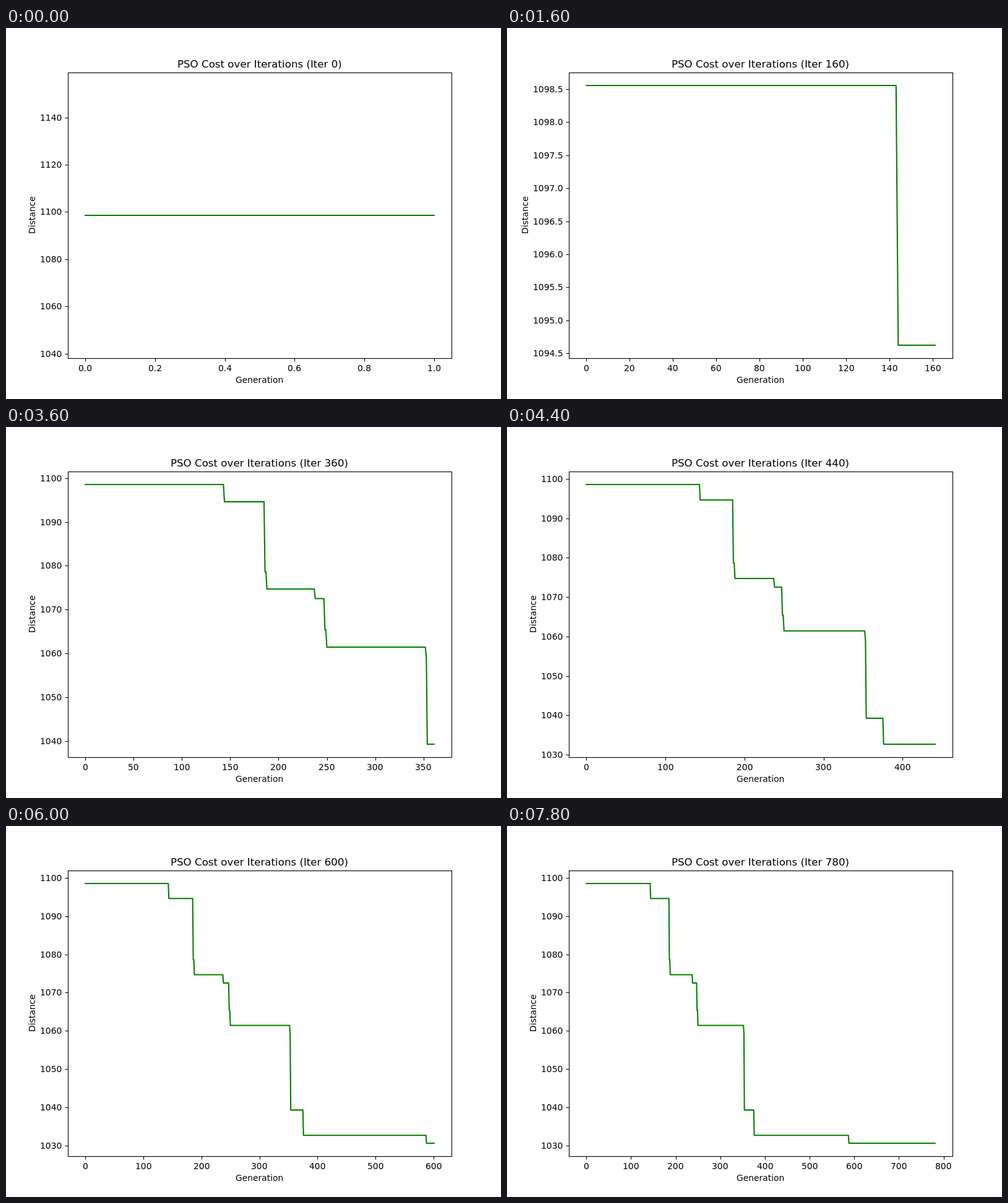
An HTML page with a canvas for the animation above (8 s loop, 800 by 600 pixels).

```html
<!DOCTYPE html>
<html lang="en">
<head>
<meta charset="utf-8">
<title>PSO cost chart</title>
<style>
  html, body { margin: 0; width: 100%; height: 100%; overflow: hidden; background: #fff; }
  canvas { display: block; }
</style>
</head>
<body>
<canvas id="chart" width="800" height="600"></canvas>
<script>
const ctx = document.getElementById('chart').getContext('2d');
const LOOP = 8000, STEP_MS = 200, ITERS_PER_STEP = 20;
const PX_PER_PT = 100 / 72;
const box = { left: 100, right: 720, top: 72, bottom: 534 };

// [generation, best cost from that generation on]
const levels = [
  [0, 1098.555], [144, 1094.625], [186, 1078.63], [188, 1074.7],
  [238, 1072.52], [248, 1065.4], [250, 1061.42], [353, 1059.05],
  [354, 1039.27], [376, 1032.67], [588, 1030.6]
];

// Axis limits with a 5 % margin; a flat range is widened first.
function limits(min, max) {
  if (min === max) [min, max] = [min * 0.95, max * 1.05];
  const margin = (max - min) * 0.05;
  return { lo: min - margin, hi: max + margin };
}

// Smallest round step that gives at most nine intervals.
function ticks({ lo, hi }) {
  const raw = (hi - lo) / 9;
  const scale = 10 ** Math.floor(Math.log10(raw));
  const step = scale * [1, 2, 2.5, 5, 10].find(s => s * scale >= raw);
  const list = [];
  for (let i = Math.ceil(lo / step); i * step <= hi; i++) {
    list.push({ value: i * step, label: (i * step).toFixed(step < 1 ? 1 : 0) });
  }
  return list;
}

function setFont(points) {
  ctx.font = `${points * PX_PER_PT}px "DejaVu Sans", sans-serif`;
}

// align: 0 = left, 0.5 = centre, 1 = right
function text(str, x, y, align) {
  ctx.fillText(str, Math.round(x - ctx.measureText(str).width * align), Math.round(y));
}

function line(x1, y1, x2, y2) {
  ctx.beginPath();
  ctx.moveTo(x1, y1);
  ctx.lineTo(x2, y2);
  ctx.stroke();
}

const snap = v => Math.round(v) + 0.5;

function draw(iter) {
  const last = iter + 1;
  const shown = levels.filter(([start]) => start <= last);
  const best = shown[shown.length - 1][1];
  const xLim = limits(0, last), yLim = limits(best, levels[0][1]);
  const toX = v => box.left + (v - xLim.lo) / (xLim.hi - xLim.lo) * (box.right - box.left);
  const toY = v => box.bottom - (v - yLim.lo) / (yLim.hi - yLim.lo) * (box.bottom - box.top);

  ctx.fillStyle = '#fff';
  ctx.fillRect(0, 0, 800, 600);

  // Cost curve
  const fit = shown.length === 1 ? Math.round : v => v;
  const lineTo = (gen, cost) => ctx.lineTo(fit(toX(gen)), fit(toY(cost)));
  ctx.strokeStyle = '#008000';
  ctx.lineWidth = 1.5 * PX_PER_PT;
  ctx.lineCap = 'square';
  ctx.lineJoin = 'round';
  ctx.beginPath();
  shown.forEach(([start, cost], i) => {
    if (i) lineTo(start - 1, shown[i - 1][1]);
    lineTo(start, cost);
  });
  lineTo(last, best);
  ctx.stroke();

  // Frame, ticks and labels
  ctx.strokeStyle = ctx.fillStyle = '#000';
  ctx.lineWidth = 0.8 * PX_PER_PT;
  ctx.lineCap = 'butt';
  ctx.lineJoin = 'miter';
  ctx.strokeRect(box.left + 0.5, box.top + 0.5, box.right - box.left, box.bottom - box.top);

  setFont(10);
  for (const { value, label } of ticks(xLim)) {
    const x = toX(value);
    line(snap(x), box.bottom + 0.5, snap(x), box.bottom + 5.5);
    text(label, x, 555, 0.5);
  }
  let labelWidth = 0;
  for (const { value, label } of ticks(yLim)) {
    const y = toY(value);
    line(box.left - 4.5, snap(y), box.left + 0.5, snap(y));
    text(label, 90.3, y + 5, 1);
    labelWidth = Math.max(labelWidth, ctx.measureText(label).width);
  }

  text('Generation', 410, 574, 0.5);
  ctx.save();
  ctx.translate(Math.round(82.3 - labelWidth), 303);
  ctx.rotate(-Math.PI / 2);
  text('Distance', 0, 0, 0.5);
  ctx.restore();

  setFont(12);
  text(`PSO Cost over Iterations (Iter ${iter})`, 410, 64, 0.5);
}

let current = -1;
function frame() {
  const iter = Math.floor(performance.now() % LOOP / STEP_MS) * ITERS_PER_STEP;
  if (iter !== current) draw(current = iter);
  requestAnimationFrame(frame);
}
frame();
</script>
</body>
</html>
```
